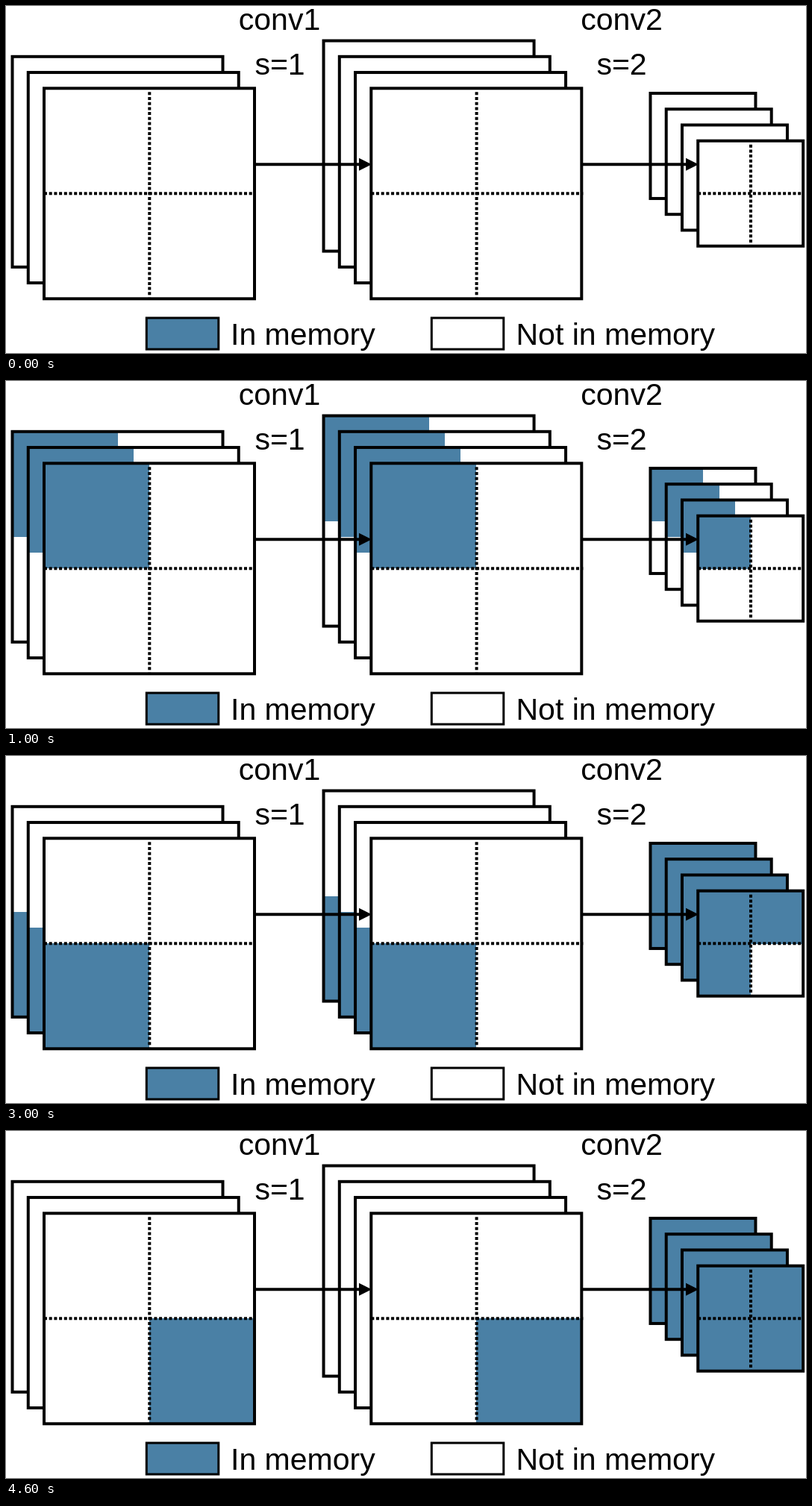
Animation, 1072 px wide and 465 px high, one loop 5 s. Source, as an HTML page with a canvas:

```html
<!DOCTYPE html>
<html>
<head>
<meta charset="utf-8">
<style>
html, body { margin: 0; width: 100%; height: 100%; overflow: hidden; background: #fff; }
canvas { display: block; }
</style>
</head>
<body>
<canvas id="stage" width="1072" height="465"></canvas>
<script>
const ctx = document.getElementById('stage').getContext('2d');
const BLUE = '#4a80a5', STEP = 21.25;

// Position of the front layer, side length and number of layers
const stacks = [
  { x: 51, y: 110.3, size: 282, layers: 3 },
  { x: 489.3, y: 110.3, size: 282, layers: 4 },
  { x: 927.2, y: 180.7, size: 141, layers: 4, keeps: true }
];

function box(x, y, w, h, fill, line) {
  ctx.fillStyle = fill;
  ctx.fillRect(x, y, w, h);
  ctx.lineWidth = line;
  ctx.strokeRect(x, y, w, h);
}

function segment(x1, y1, x2, y2) {
  ctx.beginPath();
  ctx.moveTo(x1, y1);
  ctx.lineTo(x2, y2);
  ctx.stroke();
}

function layer(x, y, size, quarters) {
  const half = size / 2;
  ctx.fillStyle = '#fff';
  ctx.fillRect(x, y, size, size);
  ctx.fillStyle = BLUE;
  for (const q of quarters)
    ctx.fillRect(Math.round(x + q % 2 * half), Math.round(y + (q >> 1) * half),
                 Math.ceil(half), Math.ceil(half));
  ctx.lineWidth = 4;
  ctx.strokeRect(x, y, size, size);
}

function stack({ x, y, size, layers, keeps }, phase) {
  const quarters = [0, 1, 2, 3].filter(q => keeps ? q < phase : q === phase - 1);
  for (let i = layers - 1; i >= 0; i--)
    layer(x - i * STEP, y - i * STEP, size, quarters);
  const half = size / 2, over = keeps ? 0 : 2;
  ctx.setLineDash([4, 2.7]);
  segment(x + half + 0.3, y + 5, x + half + 0.3, y + size - 2);
  segment(x, y + half, x + size + over, y + half);
  ctx.setLineDash([]);
}

function arrow(x1, x2, y) {
  ctx.lineWidth = 4;
  segment(x1, y, x2 - 15, y);
  ctx.fillStyle = '#000';
  ctx.beginPath();
  ctx.moveTo(x2, y);
  ctx.lineTo(x2 - 17, y - 8.5);
  ctx.lineTo(x2 - 17, y + 8.5);
  ctx.fill();
}

function label(text, x, y, align) {
  ctx.fillStyle = '#000';
  ctx.textAlign = align;
  ctx.fillText(text, x, y);
}

function draw(phase) {
  ctx.fillStyle = '#fff';
  ctx.fillRect(0, 0, 1072, 465);
  ctx.strokeStyle = '#000';
  stacks.forEach(s => stack(s, phase));
  arrow(333, 490, 212.3);
  arrow(771, 928, 212.3);

  ctx.font = '41px "Liberation Sans", Arial, sans-serif';
  label('conv1', 366.5, 32, 'center');
  label('s=1', 367, 92, 'center');
  label('conv2', 825, 32, 'center');
  label('s=2', 825, 92, 'center');

  box(188.3, 418, 96.5, 42, BLUE, 3);
  box(570.3, 418, 96.5, 42, '#fff', 3);
  label('In memory', 301, 454, 'left');
  label('Not in memory', 683.5, 454, 'left');
}

function tick() {
  draw(Math.floor(performance.now() / 1000) % 5);
  requestAnimationFrame(tick);
}
tick();
</script>
</body>
</html>
```
